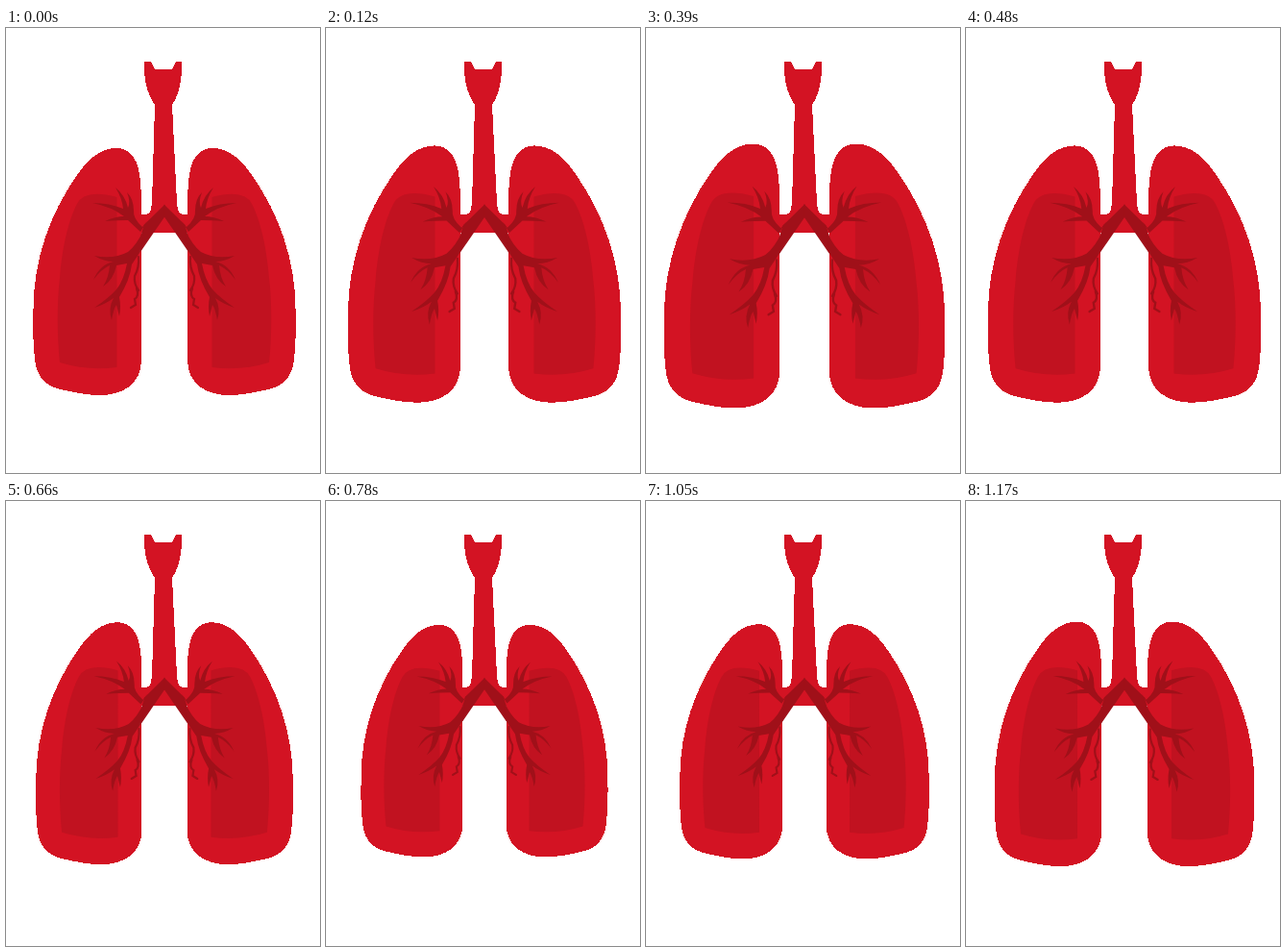
Animation of 327 by 463 pixels, one loop 1200 ms. Source, as an HTML page:

```html
<!DOCTYPE html>
<html lang="en">
<head>
<meta charset="utf-8">
<title>Breathing lungs</title>
<style>
  html, body { margin: 0; width: 100%; height: 100%; overflow: hidden; background: #fff; }
  svg { display: block; width: 100%; height: 100%; }
  .red { fill: #d31323; shape-rendering: crispEdges; }
  .shade { fill: #c11220; }
  .vein { fill: #a01019; }
  .twig { fill: none; stroke: #a01019; stroke-width: 2.2; stroke-linecap: round; }
</style>
</head>
<body>
<svg viewBox="0 0 327 463">
  <path class="red" d="M144 35H151L155 43H173L177 35H183Q184 63 173 80L178 182Q179 193 183 193.500H194V213H136V193.500H147Q151 193 152 182L155 80Q143 63 144 35Z"/>
  <g id="lungs">
    <g id="lung">
      <path class="red" d="M141 345V195C141 178 141 165 139 152C136 133 127 125 115 125C98 125 85 137 74 153C45 194 28.500 243 28.500 292C28 312 28 326 30 345C32 364 42 372 55 375.500C70 379 83 382 98 382C122 382 141 370 141 345Z"/>
      <path class="shade" d="M115.500 176V353Q85 357 56 348C53 320 53 285 56 260C59 222 67 196 74 183Q82 167 115.500 176Z"/>
      <!-- Bronchus, then upper and lower branches -->
      <path class="vein" d="M165.500 183.500L144 204.500L136 230L141 231.500L165.500 196Z"/>
      <path class="vein" d="M147 201L142 207Q132 198 133 190Q133 178 126 171Q130 181 127 187Q124 174 114 166Q121 177 122 188Q108 182 90 182Q110 186 123 196Q114 196 103 201Q117 200 127 200L140 212Z"/>
      <path class="vein" d="M144 209Q136 226 127 233Q112 241 92 237Q102 243 112 243Q98 246 91 262Q99 251 108 247Q107 260 101 269Q112 262 115 247L126 245Q123 262 115 272Q107 281 92 291Q104 287 112 281Q106 292 110 304Q112 292 115 288L118 300Q120 290 118 280Q129 262 131 246L141 231Z"/>
      <path class="twig" d="M138 238Q139 249 134 258Q133 266 138 273M136 271Q139 279 134 282L135 288L130 291"/>
    </g>
    <use href="#lung" transform="matrix(-1 0 0 1 330 0)"/>
  </g>
</svg>
<script>
  const PERIOD = 1200, STEP = 30, CX = 165, CY = 189;
  const lungs = document.getElementById('lungs');

  // Linear swell and shrink by a tenth around the root of the bronchi
  function draw() {
    const time = Math.floor(performance.now() % PERIOD / STEP) * STEP;
    const wave = Math.asin(Math.sin(time / PERIOD * 2 * Math.PI)) * 2 / Math.PI;
    const scale = 1 + .1 * wave;
    lungs.setAttribute('transform',
      `translate(${CX} ${CY}) scale(${scale}) translate(${-CX} ${-CY})`);
    requestAnimationFrame(draw);
  }
  draw();
</script>
</body>
</html>
```
